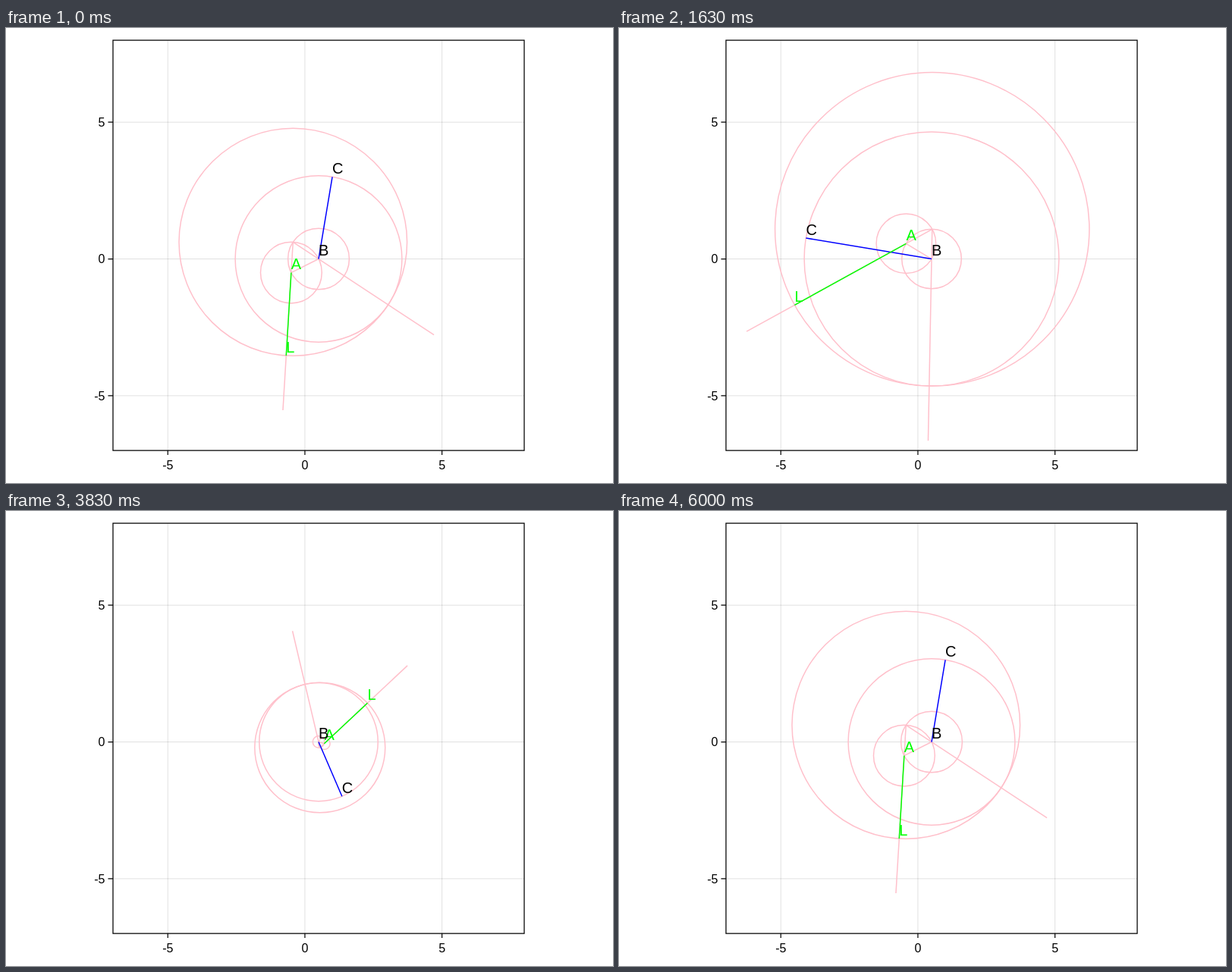
Write an HTML page that moves like this. It is 800 px wide and 600 px high and loops after 6040 ms.

```html
<!DOCTYPE html>
<html lang="en">
<head>
<meta charset="utf-8">
<title>Transferring a segment with compass and straightedge</title>
<style>
  html, body { margin: 0; width: 100%; height: 100%; overflow: hidden; background: #fff; }
  svg { display: block; width: 800px; height: 600px; }
  text { font-family: "Liberation Sans", Arial, sans-serif; }
  .tick { font-size: 16px; }
  .label { font-size: 20px; }
</style>
</head>
<body>
<svg id="stage" viewBox="0 0 800 600"></svg>
<script>
const LOOP = 6040, FPS = 24, STEPS = 144;
const BOX = { left: 141, right: 683, top: 16, bottom: 557 };
const MIN = -7, SPAN = 15;
const SCALE_X = (BOX.right - BOX.left) / SPAN;
const SCALE_Y = (BOX.bottom - BOX.top) / SPAN;
const PINK = '#ffc0cb', BLUE = '#0000ff', LIME = '#00ff00';

const stage = document.getElementById('stage');
const px = x => BOX.left + (x - MIN) * SCALE_X;
const py = y => BOX.bottom - (y - MIN) * SCALE_Y;

function set(node, attrs) {
  for (const key in attrs) node.setAttribute(key, attrs[key]);
  return node;
}

function add(tag, attrs, content = '') {
  const node = set(document.createElementNS('http://www.w3.org/2000/svg', tag), attrs);
  node.textContent = content;
  return stage.appendChild(node);
}

function drawAxes() {
  const { left, right, top, bottom } = BOX;
  const path = (d, stroke, width) => add('path', { d, stroke, 'stroke-width': width, fill: 'none' });
  for (const v of [-5, 0, 5]) {
    const x = px(v), y = py(v);
    path(`M${x} ${top}V${bottom}M${left} ${y}H${right}`, 'rgba(0,0,0,0.12)', 1);
    path(`M${x} ${bottom}v6M${left} ${y}h-6.5`, '#000', 1.2);
    add('text', { class: 'tick', x, y: 581.5, 'text-anchor': 'middle' }, v);
    add('text', { class: 'tick', x: 130.5, y: y + 5.7, 'text-anchor': 'end' }, v);
  }
  return () => path(`M${left} ${top}H${right}V${bottom}H${left}Z`, '#000', 1.25);
}

// Vector helpers on [x, y] pairs
const sub = (p, q) => [p[0] - q[0], p[1] - q[1]];
const along = (p, dir, len) => [p[0] + dir[0] * len, p[1] + dir[1] * len];
const dist = (p, q) => Math.hypot(...sub(p, q));
const unit = (p, q) => sub(q, p).map(v => v / dist(p, q));
const polar = (r, a) => [r * Math.cos(a), r * Math.sin(a)];

const drawFrame = drawAxes();
const circle = () => add('ellipse', { fill: 'none', stroke: PINK, 'stroke-width': 1.5 });
const line = stroke => add('line', { stroke, 'stroke-width': 1.5 });
const label = (name, fill) => add('text', { class: 'label', fill }, name);

const circles = [circle(), circle(), circle(), circle()];
const guides = [line(PINK), line(PINK), line(PINK)];
const segBC = line(BLUE), segAL = line(LIME);
drawFrame();
const labels = [label('A', LIME), label('B', '#000'), label('C', '#000'), label('L', LIME)];

function placeCircle(node, c, r) {
  set(node, { cx: px(c[0]), cy: py(c[1]), rx: r * SCALE_X, ry: r * SCALE_Y });
}

function placeLine(node, p, q) {
  set(node, { x1: px(p[0]), y1: py(p[1]), x2: px(q[0]), y2: py(q[1]) });
}

function update(theta) {
  const A = polar(Math.SQRT1_2, 1.25 * Math.PI - theta);
  const B = [0.5, 0];
  const orbit = polar(Math.sqrt(10), Math.atan2(3, 1) + theta);
  const C = along(orbit, unit(B, orbit), Math.sin(theta));

  // D is the apex of the equilateral triangle on AB
  const [dx, dy] = sub(B, A), h = Math.sqrt(3) / 2;
  const D = [(A[0] + B[0]) / 2 - dy * h, (A[1] + B[1]) / 2 + dx * h];
  const base = dist(A, B), radius = dist(B, C), reach = base + radius;
  const toA = unit(D, A), toB = unit(D, B);
  const L = along(D, toA, reach);

  placeCircle(circles[0], A, base);
  placeCircle(circles[1], B, base);
  placeCircle(circles[2], B, radius);
  placeCircle(circles[3], D, reach);
  placeLine(guides[0], A, B);
  placeLine(guides[1], D, along(D, toA, reach + 2));
  placeLine(guides[2], D, along(D, toB, reach + 2));
  placeLine(segBC, B, C);
  placeLine(segAL, A, L);
  [A, B, C, L].forEach((p, i) => set(labels[i], { x: px(p[0]), y: py(p[1]) - 4.3 }));
}

function tick(now) {
  const t = Math.floor((now % LOOP) / 10) * 10;
  const step = Math.min(STEPS, Math.floor((t + 4.9) * FPS / 1000));
  update(2 * Math.PI * step / STEPS);
  requestAnimationFrame(tick);
}

update(0);
let start;
requestAnimationFrame(function begin(now) {
  start = now;
  const run = time => tick(time);
  run(performance.now());
});
</script>
</body>
</html>
```
